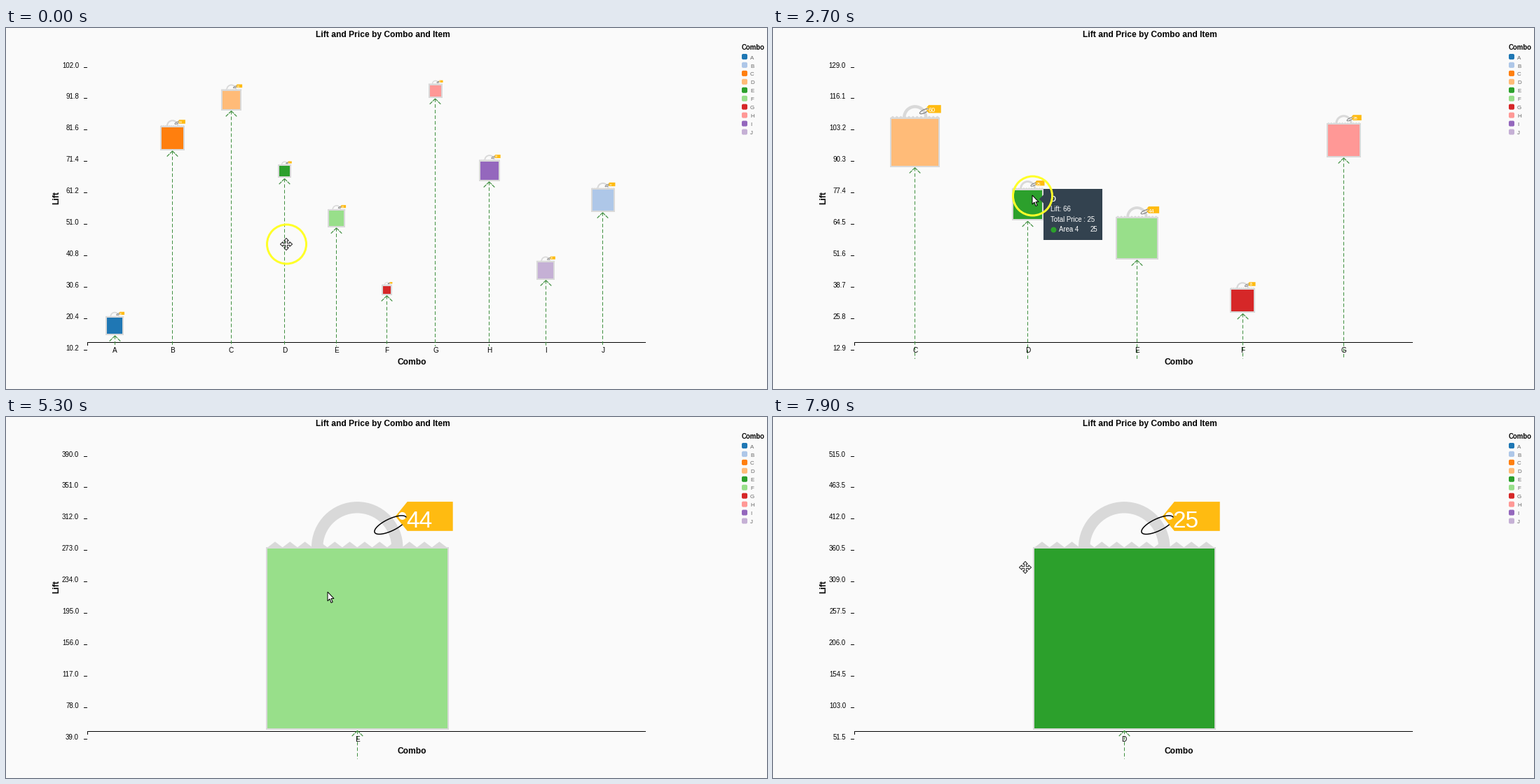
These frames come from a looping animation (1086x516 px, 8 s). A matplotlib script:

```python
import itertools

import matplotlib.pyplot as plt
import numpy as np
from matplotlib.animation import FuncAnimation
from matplotlib.lines import Line2D
from matplotlib.patches import Circle, FancyBboxPatch, Polygon, Rectangle, Wedge
from matplotlib.text import Text

W, H, DPI = 1086, 516, 100
STEP, FRAMES = 100, 80
PT = 72 / DPI

NAMES = "ABCDEFGHIJ"
LIFT = [15, 75, 88, 66, 50, 28, 92, 65, 33, 55]
PRICE = [48, 83, 60, 25, 44, 15, 28, 62, 48, 77]
PALETTE = plt.get_cmap("tab20").colors[:10]
BAG_COLORS = PALETTE[:1] + PALETTE[2:] + PALETTE[1:2]

GRAY, TAG, GREEN = "#d9d9d9", "#ffbb11", "#3f8f3f"
TIP_BG, RING, CLICK = "#33424f", "#ffff28", "#2268b8"
LEFT, RIGHT, BASE, TOP = 116, 913, 460, 56
BAGS_WIDTH = 261

# start, duration, first and last+1 item shown afterwards
ZOOMS = [(500, 300, 2, 7), (5000, 300, 4, 5), (6300, STEP, 0, 10), (7300, 400, 3, 4)]
# start, end, x and y the pointer travels to
MOVES = [(0, 300, 379, 243), (1400, 1700, 358, 247), (1700, 2300, 212, 164),
         (2300, 3100, 528, 316), (3300, 3600, 400, 290), (4000, 4600, 459, 251),
         (5400, 6000, 117, 158), (6300, 6900, 360, 215)]

fig = plt.figure(figsize=(W / DPI, H / DPI), dpi=DPI, facecolor="#fafafa")
ax = fig.add_axes([0, 0, 1, 1])
order = itertools.count(1)


def add(artist):
    artist.set_zorder(next(order))
    ax.add_artist(artist)


def rect(x, y, w, h, color):
    add(Rectangle((x, y), w, h, fc=color, lw=0))


def disc(x, y, r, color):
    add(Circle((x, y), r, fc=color, lw=0))


def shape(points, color, edge="none", width=0):
    add(Polygon(points, closed=True, fc=color, ec=edge, lw=width * PT))


def line(xs, ys, color="black", width=1.0, dash=None):
    style = "-" if dash is None else (0, [d * PT / (width * PT) for d in dash])
    add(Line2D(xs, ys, color=color, lw=width * PT, ls=style, snap=False,
               solid_capstyle="butt", dash_capstyle="butt"))


def text(x, y, s, size=9.6, color="black", ha="left", weight="normal",
         font="Liberation Sans"):
    add(Text(x, y + 0.36 * size, s, fontsize=size * PT, color=color, ha=ha,
             va="baseline", weight=weight, family=font))


def visible_items(t):
    lo, hi = 0, len(NAMES)
    for start, span, a, b in ZOOMS:
        k = np.clip((t - start + STEP) / span, 0, 1)
        lo, hi = lo + (a - lo) * k, hi + (b - hi) * k
    return range(round(lo), round(hi))


def pointer(t):
    x, y = 400, 309
    for start, end, to_x, to_y in MOVES:
        k = np.clip((t - start) / (end - start), 0, 1)
        k = k * k * (3 - 2 * k)
        x, y = x + (to_x - x) * k, y + (to_y - y) * k
    return x, y


def axis_top(items):
    """Fewer bags are drawn larger and need more headroom."""
    headroom = 6.82 * len(items) ** -1.729 - 0.02
    return round(max(LIFT[i] for i in items) * (1 + headroom))


def layout(items, top):
    """Return (index, left, upper edge, width) of each bag."""
    n = len(items)
    scale = BAGS_WIDTH / sum(np.sqrt(PRICE[i]) for i in items)
    gap = (508.5 + 0.9 * n) / n
    x = LEFT + gap / 2
    bags = []
    for i in items:
        w = scale * np.sqrt(PRICE[i])
        bottom = BASE - (LIFT[i] - top / 10) * (BASE - TOP) / (0.9 * top)
        bags.append((i, x, bottom - w, w))
        x += w + gap
    return bags


def draw_title_and_legend():
    text(538, 8.2, "Lift and Price by Combo and Item", 12, ha="center", weight="bold")
    text(1050, 28, "Combo", weight="bold")
    for k, (name, color) in enumerate(zip(NAMES, PALETTE)):
        y = 41 + 11.95 * k
        add(FancyBboxPatch((1052, y - 2), 4, 4, boxstyle="round,pad=2,rounding_size=2",
                           fc=color, lw=0))
        text(1062, y + 0.7, name, 8, "#666666")


def draw_axes(top):
    for k, y in enumerate(np.linspace(TOP, BASE, 10)):
        y = int(y) + 0.5
        text(104, y - 3, f"{top * (10 - k) / 10:.1f}", ha="right")
        line([LEFT - 5, LEFT], [y, y])
    line([LEFT + 0.5, LEFT + 0.5, RIGHT], [454, 449.5, 449.5])
    add(Text(72, 243, "Lift", fontsize=12 * PT, weight="bold", rotation=90,
             ha="center", va="center", family="Liberation Sans"))
    text(579, 476.8, "Combo", 12, ha="center", weight="bold")


def draw_arrow(x, y, end):
    x = int(x) + 0.5
    line([x, x], [y + 1, end], GREEN, 1, (5, 3))
    for side in (-1, 1):
        line([x, x + side * 8], [y + 1, y + 9], GREEN, 1.2, (5, 1))


def draw_bag(i, x, y, w):
    def at(u, v):
        return x + u * w, y + v * w

    add(Wedge(at(0.5, 0), w / 4, 180, 360, width=w / 16, fc=GRAY, lw=0))
    teeth = np.arange(25)
    xs, ys = at(0.01 + 0.98 * teeth / 24, -0.031 * (teeth % 2))
    shape([(x, y + 1), *zip(xs, ys), (x + w, y + 1)], GRAY)
    rect(x, y, w, w, GRAY)
    rect(x + 2, y + 2, w - 4, w - 4, BAG_COLORS[i])

    l, r, t, b = 0.774, 1.023, -0.25, -0.09
    shape([at(l, t), at(r, t), at(r, b), at(l, b), at(0.709, (t + b) / 2)], TAG)
    disc(*at(0.747, -0.172), 0.021 * w, "white")
    # string through the hole of the tag
    turn = np.linspace(0.9, 2 * np.pi, 40)
    a, b = 0.096 * np.cos(turn), 0.033 * np.sin(turn)
    line(*at(0.682 + 0.9 * a + 0.43 * b, -0.123 - 0.43 * a + 0.9 * b),
         "black" if w > 100 else "#777777", min(1.5, 0.5 + w / 120))
    text(*at(0.838, -0.153), str(PRICE[i]), 0.128 * w, "white", "center")


def draw_tooltip(i, x, y, weight="bold"):
    rect(x, y, 84, 73, TIP_BG)
    shape([(x + 0.5, y + 8), (x - 6.5, y + 15), (x + 0.5, y + 22)], TIP_BG)
    rows = [NAMES[i], f"Lift: {LIFT[i]}", f"Total Price : {PRICE[i]}"]
    for k, row in enumerate(rows):
        text(x + 10, y + 15 + 14.3 * k, row, color="white",
             weight="normal" if k else weight)
    disc(x + 14, y + 59, 4, BAG_COLORS[i])
    text(x + 22, y + 58, f"Area {i + 1}", color="white")
    text(x + 77, y + 58, str(PRICE[i]), color="white", ha="right")


def draw_collapsed(i):
    """The chart with all parts fallen into the upper left corner."""
    rect(13, 40.5, 254, 254, GRAY)
    rect(16, 44, 229, 229, BAG_COLORS[i])
    rect(13, 40.5, 59, 37.5, TAG)
    text(12.5, 429, NAMES[i], 14.5, "#666666", font="Liberation Serif")
    draw_tooltip(i, 248, 40.5, "normal")


def draw_chart(items, px, py, tips):
    """Draw the chart and tell whether the pointer is over a bag."""
    top = axis_top(items)
    bags = layout(items, top)
    draw_axes(top)
    end = max(455, 493 - 4 * len(bags))
    hit = None
    for bag in bags:
        i, x, y, w = bag
        draw_arrow(x + w / 2, y + w, end)
        text(x + w / 2, 460, NAMES[i], 10, ha="center")
        draw_bag(*bag)
        if 0 <= px - x <= w and 0 <= py - y <= w:
            hit = bag
    if hit and tips:
        i, x, y, w = hit
        draw_tooltip(i, x + w, y)
    return hit is not None


def draw_pointer(x, y, over):
    if over:
        pts = np.array([(0, 0), (0, 13), (3, 10), (5, 15.5), (7.2, 14.5), (5, 9.5), (9, 9.5)])
        shape(pts + (x, y - 1), "white", "black", 1)
        return
    half = [(-1.3, -1.3), (-1.3, -4.8), (-3.4, -4.8), (0, -8.6)]
    arm = np.array(half + [(-u, v) for u, v in half[2:0:-1]])
    quarter = np.array([(0, 1), (-1, 0)])
    arms = [arm @ np.linalg.matrix_power(quarter, k) for k in range(4)]
    shape(np.vstack(arms) + (x, y), "white", "#222222", 1)


def draw_ring(t, x, y):
    if 6100 <= t < 6300:
        radius, color = 17 - 9 * (t - 6100) / STEP, CLICK
    elif t < 500 or 1400 <= t < 5000 or 5500 <= t < 7300:
        radius, color = 28, RING
    else:
        return
    add(Circle((x + 0.5, y), radius, fc="none", ec=color, lw=3 * PT))


def update(frame):
    global order
    t = frame * STEP
    order = itertools.count(1)
    ax.clear()
    ax.set(xlim=(0, W), ylim=(H, 0))
    ax.axis("off")

    x, y = pointer(t)
    items = visible_items(t)
    draw_title_and_legend()
    if 6000 <= t < 6300:
        draw_collapsed(items[0])
        over = True
    else:
        over = draw_chart(items, x, y, 1400 <= t < 4800 or 5500 <= t < 6000)
    draw_pointer(x, y, over)
    draw_ring(t, x, y)
    return []


anim = FuncAnimation(fig, update, frames=FRAMES, interval=STEP, init_func=lambda: [],
                     repeat=True, repeat_delay=0, blit=False)
plt.show()
```
